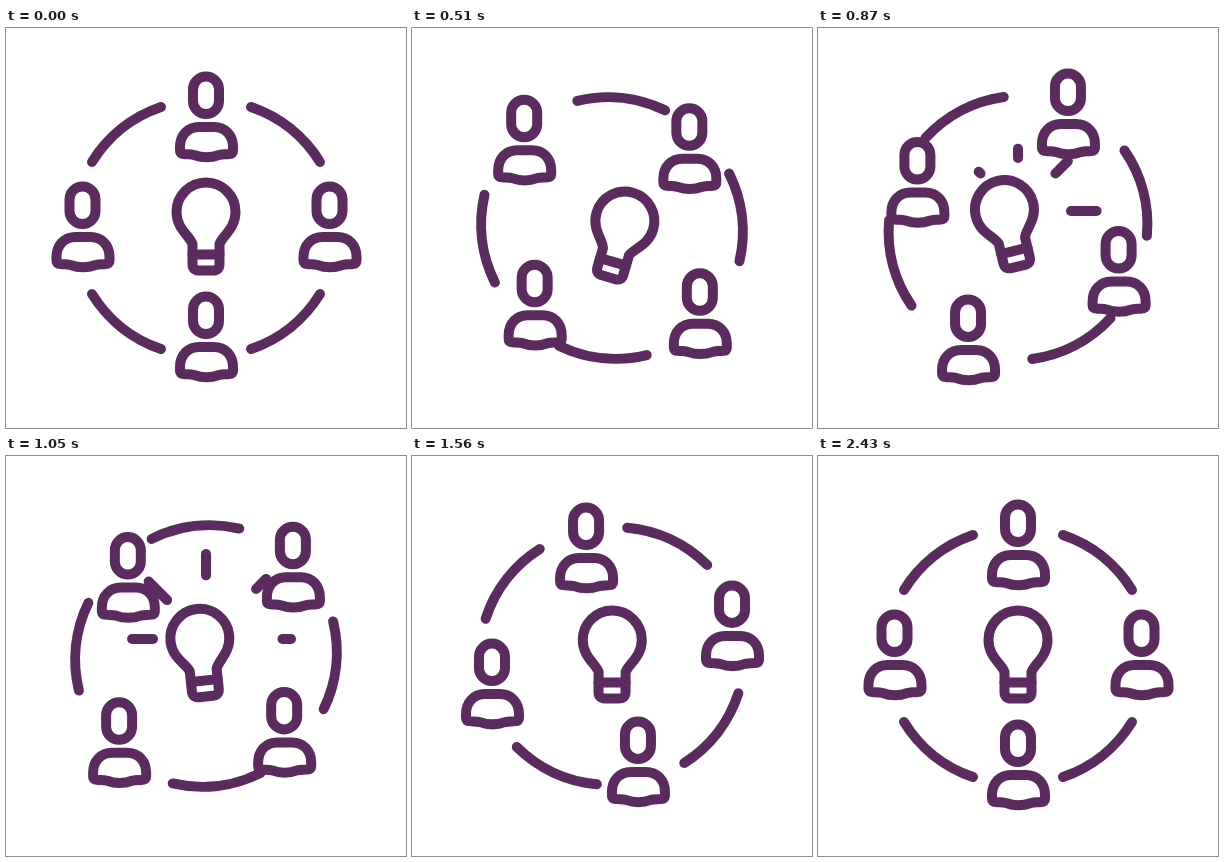
Animation, 400 px wide and 400 px high, one loop 4.46 s. Source, as an HTML page:

```html
<!DOCTYPE html>
<html lang="en">
<head>
<meta charset="utf-8">
<title>Team idea</title>
<style>
html, body { margin: 0; width: 100%; height: 100%; overflow: hidden; background: #fff; }
svg { display: block; width: 100%; height: 100%; }
</style>
</head>
<body>
<svg viewBox="0 0 400 400" fill="none" stroke="#5b2a5f" stroke-width="10" stroke-linecap="round" stroke-linejoin="round">
  <defs>
    <g id="person">
      <rect x="187" y="48.5" width="26" height="37.5" rx="13"/>
      <path d="M174 119C174 107 182 99 193 99H208C219 99 227 107 227 119V123Q227 126 223.5 126C219 126.500 217 126 213 127Q200.500 131.500 188 127C184 126 182 126.500 177.500 126Q174 126 174 123Z"/>
    </g>
    <path id="arc" d="M86 134A130 130 0 0 1 155 79"/>
  </defs>
  <g id="ring">
    <use href="#arc"/>
    <use href="#arc" transform="matrix(-1 0 0 1 400 0)"/>
    <use href="#arc" transform="matrix(1 0 0 -1 0 400)"/>
    <use href="#arc" transform="matrix(-1 0 0 -1 400 400)"/>
  </g>
  <g id="rays"></g>
  <g id="bulb">
    <path d="M186.500 216C184 208 170.500 201 170.500 184A29.500 29.500 0 0 1 229.500 184C229.500 201 216 208 213.500 216V236Q213.500 242.500 207 242.500H193Q186.500 242.500 186.500 236Z"/>
    <path d="M186.500 226.500H213.500"/>
  </g>
  <g id="people"></g>
</svg>
<script>
const LOOP = 4460, STEP = 30, TURN = 2430;
const NS = 'http://www.w3.org/2000/svg';
const get = id => document.getElementById(id);
const rad = deg => deg * Math.PI / 180;
const clamp = u => Math.min(1, Math.max(0, u));
const smooth = u => u * u * (3 - 2 * u);

function add(parent, tag) {
  return get(parent).appendChild(document.createElementNS(NS, tag));
}

const people = [[0, -110], [123.5, 0], [0, 110], [-123.5, 0]].map(([x, y]) => {
  const el = add('people', 'use');
  el.setAttribute('href', '#person');
  return { el, x, y };
});
const rays = [0, 45, 90, 135, 180].map(deg => ({ el: add('rays', 'line'), a: rad(-deg) }));

// Cubic easing curve (.335, 0, .125, 1), solved by bisection
function turnEase(x) {
  let lo = 0, hi = 1;
  for (let i = 0; i < 30; i++) {
    const s = (lo + hi) / 2, r = 1 - s;
    if (3 * r * r * s * 0.335 + 3 * r * s * s * 0.125 + s * s * s < x) lo = s;
    else hi = s;
  }
  return smooth(lo);
}

// Smooth interpolation between [time, value] keys
function track(keys, t) {
  for (let i = 1; i < keys.length; i++) {
    const [t0, a] = keys[i - 1], [t1, b] = keys[i];
    if (t < t1) return a + (b - a) * smooth((t - t0) / (t1 - t0));
  }
  return keys[keys.length - 1][1];
}

const tilt = [[0, 0], [385, 22], [870, -13.5], [1250, 2.6], [1800, -1.3], [1950, -1.3], [2430, 0]];
const shiftX = [[0, 0], [370, -4], [660, -1.3], [870, -0.5], [1230, 0]];
const shiftY = [[0, 0], [370, 14.5], [640, 0], [870, -4], [1230, 0]];

function drawRay({ el, a }, i, t) {
  const age = t - 660 - i * 53;
  const inner = 53 + 32 * (1 - (1 - clamp((age - 220) / 350)) ** 2);
  const outer = 53 + 32 * smooth(clamp(age / 295));
  const shown = age > 0 && age <= 570;
  el.setAttribute('visibility', shown ? 'visible' : 'hidden');
  const put = (n, r) => {
    el.setAttribute('x' + n, 200 + r * Math.cos(a));
    el.setAttribute('y' + n, 183 + r * Math.sin(a));
  };
  put(1, Math.min(inner, outer));
  put(2, outer + 0.01);
}

function draw(t) {
  const deg = 180 * turnEase(clamp(t / TURN));
  const c = Math.cos(rad(deg)), s = Math.sin(rad(deg));
  get('ring').setAttribute('transform', `rotate(${deg} 200 200)`);
  for (const { el, x, y } of people) {
    el.setAttribute('transform', `translate(${x * c - y * s} ${x * s + y * c + 110})`);
  }
  get('bulb').setAttribute('transform',
    `translate(${track(shiftX, t)} ${track(shiftY, t)}) rotate(${track(tilt, t)} 200 240)`);
  rays.forEach((ray, i) => drawRay(ray, i, t));
}

const start = performance.now();
function tick() {
  const t = (performance.now() - start) % LOOP;
  draw(Math.floor(t / STEP) * STEP);
  requestAnimationFrame(tick);
}
tick();
</script>
</body>
</html>
```
